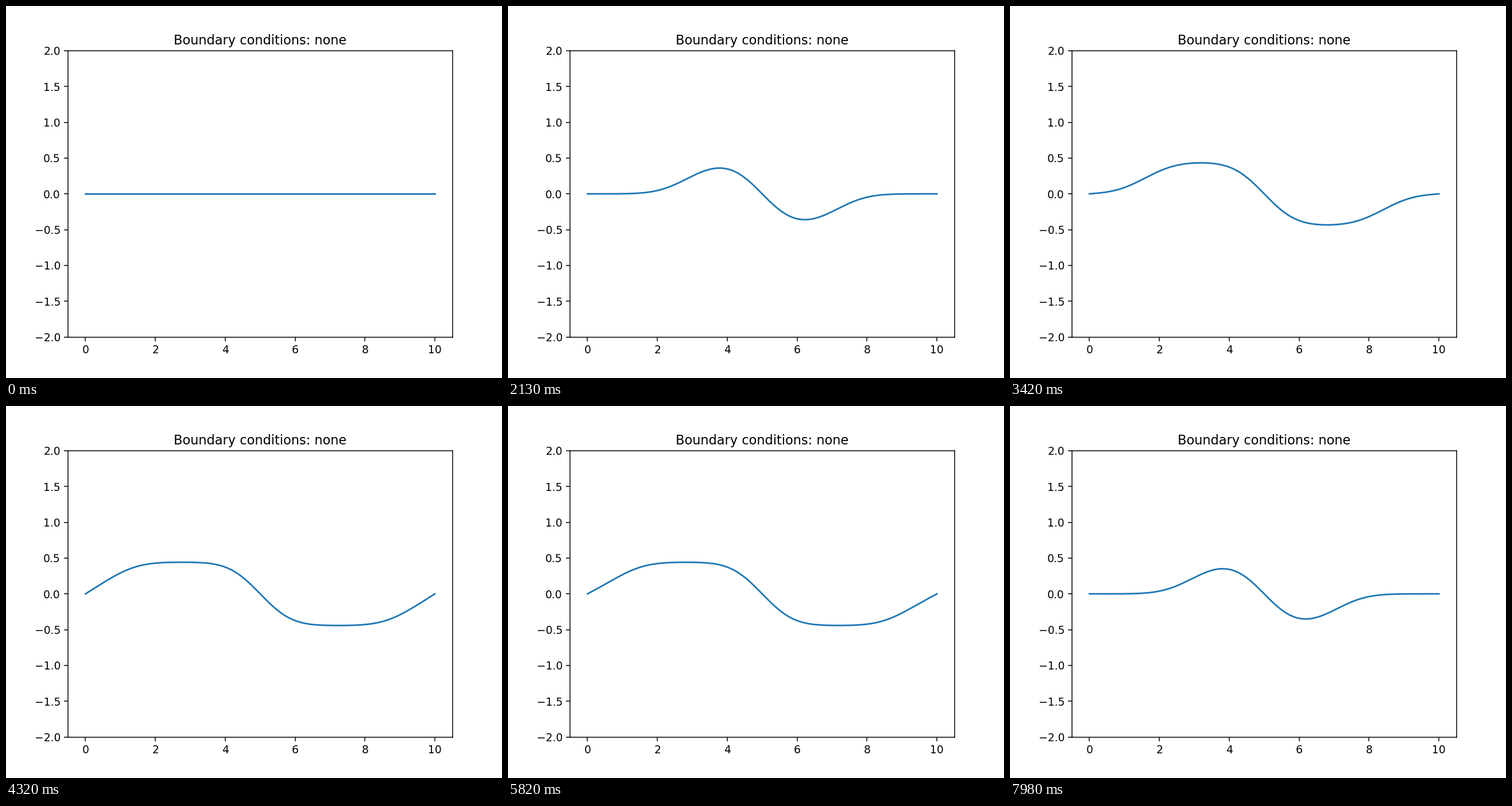
A matplotlib script for the animation above (8 s loop, 864 by 648 pixels).

```python
import math

import matplotlib.pyplot as plt
import numpy as np
from matplotlib.animation import FuncAnimation

LOOP_MS = 8000
FRAMES = 267
DT = 0.03        # simulated seconds per frame, wave speed 1
LENGTH = 10.0
MID = LENGTH / 2

erf = np.vectorize(math.erf)
x = np.linspace(0, LENGTH, 201)


def steady(s):
    """Solution of K'' = (s - MID) exp(-(s - MID)^2), mirrored at the fixed ends."""
    steps = sum(erf(s - MID - LENGTH * m) for m in range(-2, 3))
    return -math.sqrt(math.pi) / 4 * steps


def wave(t):
    """String at rest driven by a constant force: d'Alembert form."""
    return steady(x) - (steady(x + t) + steady(x - t)) / 2


fig, ax = plt.subplots(figsize=(6.4, 4.8), dpi=135)
line, = ax.plot(x, np.zeros_like(x))
ax.set_xlim(-0.5, 10.5)
ax.set_ylim(-2, 2)
ax.set_title("Boundary conditions: none")


def update(i):
    # the first two time levels are both at rest
    line.set_ydata(wave((i - 0.5) * DT) if i > 1 else np.zeros_like(x))
    return line,


anim = FuncAnimation(fig, update, frames=FRAMES, interval=LOOP_MS / FRAMES,
                     repeat=True, repeat_delay=0, blit=False)
plt.show()
```
